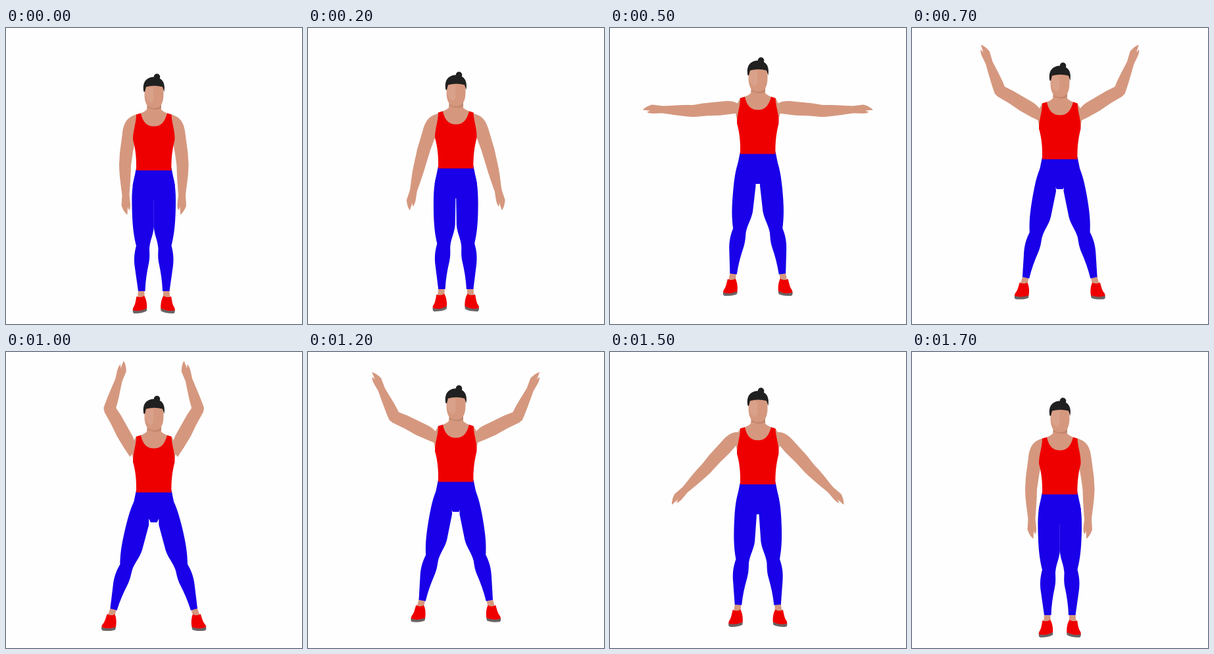
These frames come from a looping animation (450x450 px, 1800 ms). An HTML page without scripts:

```html
<!DOCTYPE html>
<html lang="en">
<head>
<meta charset="utf-8">
<title>Jumping jack</title>
<style>
  @property --lift { syntax: "<length>"; inherits: true; initial-value: 0px; }
  @property --arm  { syntax: "<angle>";  inherits: true; initial-value: 0deg; }
  @property --fore { syntax: "<angle>";  inherits: true; initial-value: 0deg; }
  @property --leg  { syntax: "<angle>";  inherits: true; initial-value: 0deg; }

  html, body { margin: 0; width: 100%; height: 100%; overflow: hidden; background: #fefefe; }
  svg { display: block; width: 100%; height: 100%; }

  .figure {
    transform: translateY(var(--lift));
    animation: jack 1800ms step-end infinite;
  }
  .arm  { transform: rotate(var(--arm)); transform-origin: 189px 144.8px; }
  .fore { transform: rotate(var(--fore)); transform-origin: 181px 208px; }
  .leg  { transform: rotate(var(--leg)); transform-origin: 206px 235px; }
  .shoe { transform: rotate(calc(var(--leg) * -.5)); transform-origin: 206px 408px; }

  .skin  { fill: #d5987f; }
  .red   { fill: #ef0000; }
  .blue  { fill: #1900e8; }
  .hair  { fill: #202020; }
  .sole  { fill: #686464; }

  /* Poses are held for 100 ms each; steps(n) fills in the poses between keys. */
  @keyframes jack {
    0%    { --lift: 0px;   --arm: 0deg;   --fore: 0deg;  --leg: 0deg; animation-timing-function: steps(2); }
    11.1% { --lift: -3px;  --arm: 9deg;   --fore: 6deg;  --leg: 1deg; animation-timing-function: steps(2); }
    22.2% { --lift: -19px; --arm: 34deg;  --fore: 18deg; --leg: 4.3deg; }
    27.7% { --lift: -25px; --arm: 77deg;  --fore: 17deg; --leg: 6.5deg; }
    33.3% { --lift: -24px; --arm: 90deg;  --fore: 40deg; --leg: 9deg; }
    38.8% { --lift: -17px; --arm: 113deg; --fore: 47deg; --leg: 11.6deg; animation-timing-function: steps(2); }
    50%   { --lift: 0px;   --arm: 143deg; --fore: 56deg; --leg: 15deg; }
    55.5% { --lift: -3px;  --arm: 143deg; --fore: 56deg; --leg: 15deg; animation-timing-function: steps(2); }
    66.6% { --lift: -19px; --arm: 108deg; --fore: 48deg; --leg: 11.4deg; }
    72.2% { --lift: -25px; --arm: 77deg;  --fore: 17deg; --leg: 8.5deg; }
    77.7% { --lift: -23px; --arm: 52deg;  --fore: 17deg; --leg: 5.9deg; animation-timing-function: steps(3); }
    94.4%, 100% { --lift: 0px; --arm: 0deg; --fore: 0deg; --leg: 0deg; }
  }
</style>
</head>
<body>
<svg viewBox="0 0 450 450">
  <defs>
    <g id="arm">
      <g class="arm skin">
        <path d="M200 131C187 134 179 141 177 160L173 190 172 208Q181 217 190 209L193 188 197 168 199 148Z"/>
        <g class="fore">
          <path d="M172 207Q174 200 181 200 188 200 190 207C190 222 188.500 240 187.500 254L189 268Q189 276 187 277L185 272 184.500 284Q179 280 175.500 270L176.500 254C175 240 172 225 172 207Z"/>
        </g>
      </g>
    </g>
    <g id="leg">
      <g class="leg">
        <path class="skin" d="M201 398H210.500V413H200Z"/>
        <g class="shoe">
          <path class="red" d="M198.500 408Q205 411 210 407C213 411 215 420 214 428L212 431H196Q191 431 193.500 425C197 420 197 414 198.500 408Z"/>
          <path class="sole" d="M193 429Q203 432 214 426V430Q208 434 195 434 192 433 193 429Z"/>
        </g>
        <path class="blue" d="M199 218C193 230 191 245 191.500 270 192 300 194 315 198 331 195 342 194 352 196 365L201 400H211.500C212 385 214 372 217 358 219 348 218 342 218 335 219 322 224 315 224.800 302V262L215 225Z"/>
      </g>
    </g>
  </defs>

  <g class="figure">
    <use href="#leg"/>
    <use href="#leg" transform="translate(449.500) scale(-1 1)"/>
    <path class="blue" d="M198 213H251.500L257 240 232 257 229.500 262H220L217.500 257 192.500 240Z"/>

    <use href="#arm"/>
    <use href="#arm" transform="translate(449.500) scale(-1 1)"/>
    <path class="skin" d="M215 110H236V124Q239 128 252 132L260 148 256 167H193.500L189.500 148 197.500 132Q211 128 214 124Z"/>
    <path class="red" d="M198 131.500L205 129.500C208 144 215 149.500 225 149.500S241 144 245 129.500L251.500 131.500C252 145 257 155 256.500 170 253 184 251 198 251.500 216.500H198C198.500 198 197 184 193 170 193 155 198 145 198 131.500Z"/>

    <path fill="#c1866e" d="M215 114H236V122Q227 127 215 121Z"/>
    <path class="skin" d="M210.500 86H239.500V100C239.500 115 235 122 225 122S210.500 115 210.500 100Z"/>
    <path fill="#d9a189" d="M213 90H224V109L221 114Q213 111 211 100Z"/>
    <ellipse class="hair" cx="229.500" cy="74.500" rx="4.800" ry="5"/>
    <path class="hair" d="M209.500 97C206.500 82 214 74.500 225 74.500S243 82 240.500 97L238 89.500Q225 86 213 89.500L211 97Z"/>
  </g>
</svg>
</body>
</html>
```
